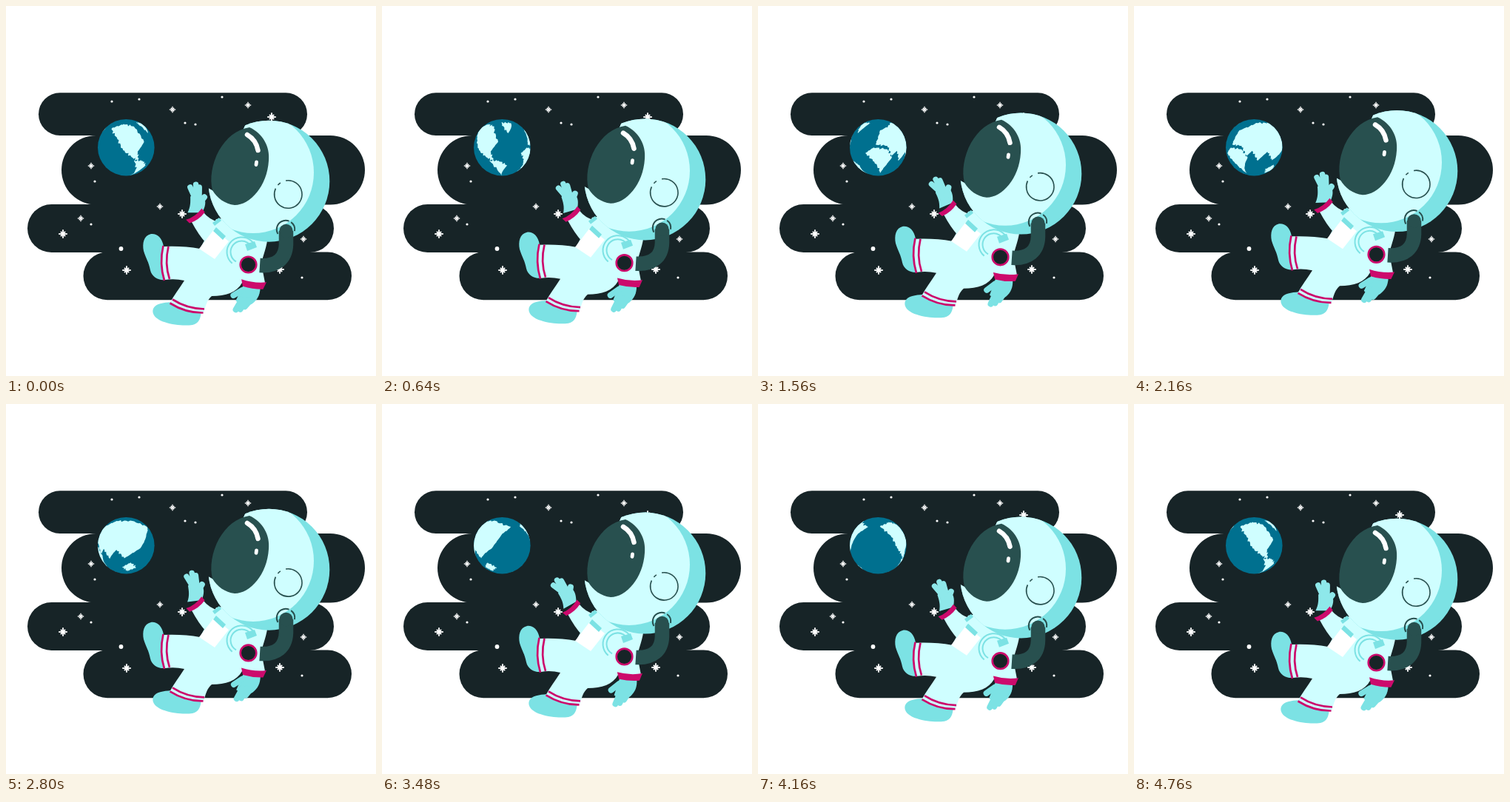
An HTML page with a canvas for the animation above (4800 ms loop, 500x500 px).

```html
<!DOCTYPE html>
<html lang="en">
<head>
<meta charset="utf-8">
<title>Floating astronaut</title>
<style>
html, body { margin: 0; width: 100%; height: 100%; overflow: hidden; background: #fff; }
canvas { display: block; width: 500px; height: 500px; }
</style>
</head>
<body>
<canvas id="stage" width="500" height="500"></canvas>
<script>
const ctx = document.getElementById('stage').getContext('2d');
const LOOP = 4800;
const TAU = Math.PI * 2;
const RAD = Math.PI / 180;
const C = {
  space: '#172427', ocean: '#00708f', pale: '#cffeff', teal: '#7ce2e4',
  hand: '#8ee8ea', visor: '#28504f', pink: '#cc0a6c', white: '#fff'
};

function fill(path, color) {
  ctx.fillStyle = color;
  ctx.fill(new Path2D(path));
}

function line(path, color, width, cap = 'butt') {
  ctx.strokeStyle = color;
  ctx.lineWidth = width;
  ctx.lineCap = cap;
  ctx.lineJoin = 'round';
  ctx.stroke(new Path2D(path));
}

function disc(x, y, r, color) {
  ctx.fillStyle = color;
  ctx.beginPath();
  ctx.arc(x, y, r, 0, TAU);
  ctx.fill();
}

function arc(x, y, r, from, to, color, width) {
  ctx.strokeStyle = color;
  ctx.lineWidth = width;
  ctx.lineCap = 'butt';
  ctx.beginPath();
  ctx.arc(x, y, r, from * RAD, to * RAD);
  ctx.stroke();
}

function clipDisc(x, y, r) {
  ctx.beginPath();
  ctx.arc(x, y, r, 0, TAU);
  ctx.clip();
}

function turned(x, y, degrees, draw) {
  ctx.save();
  ctx.translate(x, y);
  ctx.rotate(degrees * RAD);
  ctx.translate(-x, -y);
  draw();
  ctx.restore();
}

// Space and stars

function bar(left, top, right, bottom) {
  ctx.beginPath();
  ctx.roundRect(left, top, right - left, bottom - top, (bottom - top) / 2);
  ctx.fill();
}

function star(x, y, r) {
  for (let ray = 0; ray < 8; ray++) {
    const reach = ray % 2 ? r * 0.75 : r;
    const a = ray * TAU / 8;
    line(`M${x} ${y}L${x + reach * Math.cos(a)} ${y + reach * Math.sin(a)}`, C.white, r * 0.32);
  }
}

const bigStars = [[359, 150], [238, 281], [77, 308], [163, 357], [370, 356]];
const smallStars = [[225, 140], [327, 134], [115, 216], [208, 271], [101, 287], [402, 315]];
const dots = [[143, 129], [180, 126], [292, 123], [242, 158], [256, 160], [120, 237], [115, 295], [400, 367]];

function drawSpace() {
  ctx.fillStyle = C.space;
  bar(44, 117.3, 407, 175);
  bar(75, 175, 485, 268.5);
  bar(29, 268, 443, 333);
  bar(104.5, 332.5, 467, 397.2);
  ctx.fillRect(136, 150, 239, 220);
  for (const [x, y] of bigStars) star(x, y, 5.8);
  for (const [x, y] of smallStars) star(x, y, 4.2);
  for (const [x, y] of dots) disc(x, y, 1.6, C.white);
  disc(155.5, 328, 2.9, C.white);
}

// Globe: key points of each coast as [longitude, height], joined by rippling edges

const coasts = [
  [[-43, .68], [-8, .82], [24, .74], [40, .2], [24, -.15], [29, -.48], [13, -.35], [-6, -.1], [-20, .35]],
  [[18, -.46], [40, -.46], [61, -.63], [42, -.98]],
  [[45, .87], [85, .86], [62, .5]],
  [[90, -.2], [108, 0], [136, -.06], [148, -.36], [126, -.9], [108, -.5]],
  [[112, .1], [122, .6], [170, .86], [235, .86], [285, .65], [262, .42], [240, -.1], [206, -.45],
    [190, -.15], [170, -.46], [158, -.12], [146, -.3], [136, .06]],
  [[198, -.76], [222, -.6], [244, -.78], [215, -.9]]
];

function drawCoast(coast, center, radius) {
  const steps = 8;
  const middle = coast.reduce((sum, [lon]) => sum + lon, 0) / coast.length;
  const turn = 360 * Math.round((middle - center) / 360);
  ctx.beginPath();
  coast.forEach(([lon, height], i) => {
    const [nextLon, nextHeight] = coast[(i + 1) % coast.length];
    for (let s = 0; s < steps; s++) {
      const k = s / steps;
      const ripple = Math.sin(s * 2.4 + i * 1.7) * Math.sin(k * Math.PI);
      const h = height + (nextHeight - height) * k + 0.035 * ripple;
      const a = lon + (nextLon - lon) * k + 2 * ripple - center - turn;
      const x = Math.sin(Math.max(-90, Math.min(90, a)) * RAD) * Math.sqrt(Math.max(0, 1 - h * h));
      ctx.lineTo(x * radius, -h * radius);
    }
  });
  ctx.fill();
}

function drawGlobe(phase) {
  const radius = 38.3;
  ctx.save();
  ctx.translate(162.3, 191.2);
  disc(0, 0, radius, C.ocean);
  clipDisc(0, 0, radius);
  ctx.fillStyle = C.pale;
  for (const coast of coasts) drawCoast(coast, 360 * phase, radius + 0.3);
  ctx.restore();
}

// Astronaut

function drawLegsAndBody() {
  fill('M213 325C211 312 203 307 196 308C186 310 184 321 186 331C189 341 193 346 195 357C197 366 206 371 215 370Z', C.teal);
  fill('M223 400C213 401 202 402 199 409C196 417 204 424 214 427C228 432 243 432 252 431C261 429 263 422 264 412Z', C.teal);
  fill('M284 288L310 285L354 309C353 325 347 338 345 348L350 374L319 374C312 387 297 392 278 392' +
    'C272 397 270 404 267 415Q242 416 221 402C227 391 234 382 241 371Q228 368 215 370Q207 347 213 325Q240 324 262 328Z', C.pale);
  line('M212.5 324Q207 348 214 371M219.5 325Q214 348 221 369', C.pink, 2.7);
  line('M225 396.5Q244 409 268 409.5M221.5 401.5Q243 415 266.5 414.5', C.pink, 2.7);
}

function drawHead() {
  ctx.save();
  // The open face side of the helmet ends behind the visor.
  ctx.clip(new Path2D('M328 150H450V330H280L265 246L274 246.5L282 251L300 215Z'));
  clipDisc(355.3, 236.7, 82);
  ctx.fillStyle = C.teal;
  ctx.fillRect(260, 150, 190, 180);
  disc(334, 225, 82, C.pale);
  ctx.restore();
  fill('M329 164C347 172 357 190 355 209C353 243 330 269 309 269C296 268 285 259 279 249' +
    'C275 234 278 213 288 195C298 178 311 167 329 164Z', C.visor);
  line('M326 174Q338 181 340.5 195', C.white, 6.5, 'round');
  line('M338.5 211L338 214.5', C.white, 4.8, 'round');
  arc(381.3, 254.5, 18.7, -100, 205, C.visor, 1.6);
  arc(381.3, 254.5, 18.7, 222, 236, C.visor, 1.6);
}

function drawHose() {
  line('M343 350.5C366 352 378 341 378.5 322V304', C.visor, 19.5);
  disc(378.5, 304, 9.2, C.visor);
  arc(378, 302, 12.2, 150, 292, C.visor, 2);
  arc(378, 302, 12.2, 306, 370, C.visor, 2);
}

function drawChest() {
  fill('M281 302L301 318L282 342L261 328Z', C.white);
  fill('M279 293L288 286L291 290L282 297Z', C.teal);
  fill('M280 304L284 299L297 311L293 316Z', C.teal);
  arc(318.5, 332.5, 20, 130, 325, C.teal, 2);
  arc(318.5, 332.5, 15, 120, 315, C.teal, 2);
  fill('M323 322L336 318L339 326L326 331Z', C.teal);
  disc(327.5, 349.5, 11, C.space);
  arc(327.5, 349.5, 10.8, 0, 360, C.pink, 2.6);
}

function drawWavingArm(wave) {
  turned(256, 282, 15 * wave, () => {
    fill('M245 282C247 273 245 267 243 260L250 252L261 256C266 262 266 268 264 277Z', C.hand);
    line('M250 261L239.5 248M252 259L246 242.5M255 259L251.5 245', C.hand, 7.5, 'round');
    line('M257 266L261.5 256', C.hand, 8, 'round');
  });
  fill('M251 292L267 279Q274 288 287 292L285 305L270 320Q260 309 251 292Z', C.pale);
  turned(256, 283, 3 * wave, () =>
    fill('M243.5 289.5Q256 285 264 273L268.5 278Q261 289 248.5 294Z', C.pink));
}

function drawLoweredArm(wave) {
  turned(335, 376, 4 * wave, () => {
    fill('M321 378L344 381C344 391 341 397 334 403L323 408L312 400Z', C.teal);
    line('M320 385L308.5 393', C.teal, 8, 'round');
    line('M320 398L313 412M326 398L319 411M331 399L325 407', C.teal, 8, 'round');
  });
  turned(335, 374, 2 * wave - 1, () =>
    fill('M318 369.5Q335 375 352 373L347.5 382.5Q334 383 320 379Z', C.pink));
}

function render(now) {
  const phase = (now % LOOP) / LOOP;
  const lift = 7 * (1 - Math.cos(phase * TAU));
  const wave = Math.cos(phase * TAU * 2);
  ctx.fillStyle = C.white;
  ctx.fillRect(0, 0, 500, 500);
  drawSpace();
  drawGlobe(phase);
  ctx.save();
  ctx.translate(0, -lift);
  drawLegsAndBody();
  drawLoweredArm(wave);
  drawWavingArm(wave);
  drawHead();
  drawHose();
  drawChest();
  ctx.restore();
}

const start = performance.now();
function tick() {
  render(performance.now() - start);
  requestAnimationFrame(tick);
}
tick();
</script>
</body>
</html>
```
